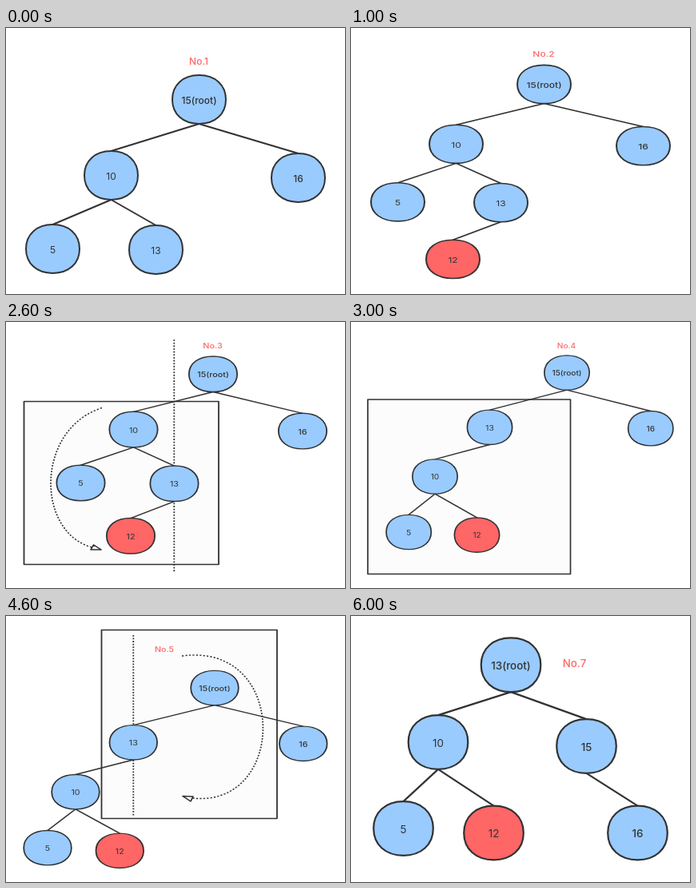
Animation, 424 px wide and 333 px high, one loop 7 s. Source, as an HTML page with a canvas:

```html
<!DOCTYPE html>
<html lang="en">
<head>
<meta charset="utf-8">
<title>Tree rotations</title>
<style>
  html, body { margin: 0; width: 100%; height: 100%; overflow: hidden; background: #fff; }
  canvas { display: block; }
</style>
</head>
<body>
<canvas id="stage" width="424" height="333"></canvas>
<script>
const ctx = document.getElementById('stage').getContext('2d');
const INK = '#323232', BLUE = '#99cbff', RED = '#ff6666';
const RX = 33.5, RY = 30.5;
let sx = 1, sy = 1;

// Every slide has its own scale, which also shapes its pen and lettering.
function at(x, y, draw) {
  ctx.save();
  ctx.translate(x, y);
  ctx.scale(sx, sy);
  draw();
  ctx.restore();
}

function stroke(path, fill, dash = []) {
  ctx.save();
  ctx.setLineDash(dash);
  if (fill) {
    ctx.fillStyle = fill;
    ctx.fill(path);
  }
  ctx.scale(sx, sy);
  const scaled = new Path2D();
  scaled.addPath(path, new DOMMatrix().scale(1 / sx, 1 / sy));
  ctx.stroke(scaled);
  ctx.restore();
}

function text(label, x, y, color, weight) {
  at(x, y, () => {
    ctx.font = `${weight} 12px Inter, sans-serif`;
    ctx.fillStyle = color;
    ctx.fillText(label, 0, 4.4);
  });
}

function node(label, x, y) {
  const kx = RX * 0.6, ky = RY * 0.6;
  at(x, y, () => {
    ctx.beginPath();
    ctx.moveTo(0, -RY);
    ctx.bezierCurveTo(kx, -RY, RX, -ky, RX, 0);
    ctx.bezierCurveTo(RX, ky, kx, RY, 0, RY);
    ctx.bezierCurveTo(-kx, RY, -RX, ky, -RX, 0);
    ctx.bezierCurveTo(-RX, -ky, -kx, -RY, 0, -RY);
    ctx.closePath();
    ctx.fillStyle = label === '12' ? RED : BLUE;
    ctx.fill();
    ctx.stroke();
  });
  text(label, x, y + sy, INK, /root|15|16/.test(label) ? 500 : 400);
}

const line = (d, fill) => stroke(new Path2D(d), fill);
const dots = d => stroke(new Path2D(d), null, [2.5, 2.5]);

function box(left, top, right, bottom) {
  line(`M${left} ${top}H${right}V${bottom}H${left}Z`, '#fcfcfc');
}

// links holds parent-child pairs of node positions in the list
function tree(links, nodes) {
  for (const [from, to] of links.split(' ')) {
    const [, x1, y1] = nodes[from], [, x2, y2] = nodes[to];
    line(`M${x1} ${y1 + RY * sy}L${x2} ${y2 - RY * sy}`);
  }
  nodes.forEach(n => node(...n));
}

function begin(scaleX, scaleY, number, x, y) {
  sx = scaleX;
  sy = scaleY;
  ctx.fillStyle = '#fff';
  ctx.fillRect(0, 0, 424, 333);
  ctx.strokeStyle = INK;
  ctx.lineWidth = 2;
  ctx.lineJoin = 'round';
  ctx.textAlign = 'center';
  return () => text('No.' + number, x, y, RED, 500);
}

const slides = [
  () => {
    begin(1, 1, 1, 241, 41.5)();
    tree('01 02 13 14', [['15(root)', 241.5, 89.5], ['10', 131.5, 184.5], ['16', 365.5, 187.5],
      ['5', 58.5, 276.5], ['13', 187.5, 277.5]]);
  },
  () => {
    begin(1, 0.79, 2, 241, 32.8)();
    tree('01 02 13 14 45', [['15(root)', 241.5, 70.5], ['10', 131.5, 145.3], ['16', 365.5, 147.6],
      ['5', 58.5, 217.8], ['13', 187.5, 218.6], ['12', 127.5, 289.4]]);
  },
  () => {
    const title = begin(0.9, 0.73, 3, 258.5, 30.2);
    box(22.5, 99.5, 266, 303.5);
    dots('M210.3 22V314');
    dots('M120 107.5C37 134 37 262 107 282');
    line('M106 285L109.5 279L119 285Z', '#fff');
    title();
    tree('01 02 13 14 45', [['15(root)', 259, 65.2], ['10', 159.5, 134.6], ['16', 371, 136.6],
      ['5', 93.5, 201.5], ['13', 210.5, 202.3], ['12', 156, 267.8]]);
  },
  () => {
    const title = begin(0.84, 0.71, 4, 269.5, 29.5);
    box(21, 97, 274.5, 315.5);
    title();
    tree('01 02 13 34 35', [['15(root)', 270, 63.5], ['13', 173.5, 131.8], ['16', 374.8, 133.2],
      ['10', 105, 193.5], ['5', 72.2, 263], ['12', 157.5, 266.6]]);
  },
  () => {
    const title = begin(0.89, 0.71, 5, 198, 42);
    box(119.5, 17.5, 339, 253.5);
    dots('M159.3 24V250');
    dots('M220 50C354 32 352 241 233 228');
    line('M221 225.5L234 226L231 232Z', '#fff');
    title();
    tree('01 02 13 34 35', [['15(root)', 261, 90], ['13', 159.3, 158.3], ['16', 371.8, 159.8],
      ['10', 87, 220.2], ['5', 52, 290.2], ['12', 142.3, 293.8]]);
  },
  () => {
    const title = begin(1.113, 0.95, 6, 290.5, 60);
    box(146.5, 24, 393, 231);
    title();
    tree('01 02 13 14 25', [['13', 200, 99.2], ['10', 109, 182.3], ['15(root)', 306, 177.5],
      ['5', 65.5, 275.8], ['12', 178.5, 280.3], ['16', 358.5, 280.5]]);
  },
  () => {
    begin(1.113, 1.11, 7, 279.5, 59.5)();
    tree('01 02 13 14 25', [['13(root)', 200, 61.3], ['10', 109, 158], ['15', 294.5, 163],
      ['5', 65.5, 266], ['12', 178.5, 271.5], ['16', 358.5, 271.5]]);
  }
];

function frame() {
  slides[Math.floor(performance.now() / 1000) % slides.length]();
  requestAnimationFrame(frame);
}
frame();
</script>
</body>
</html>
```
